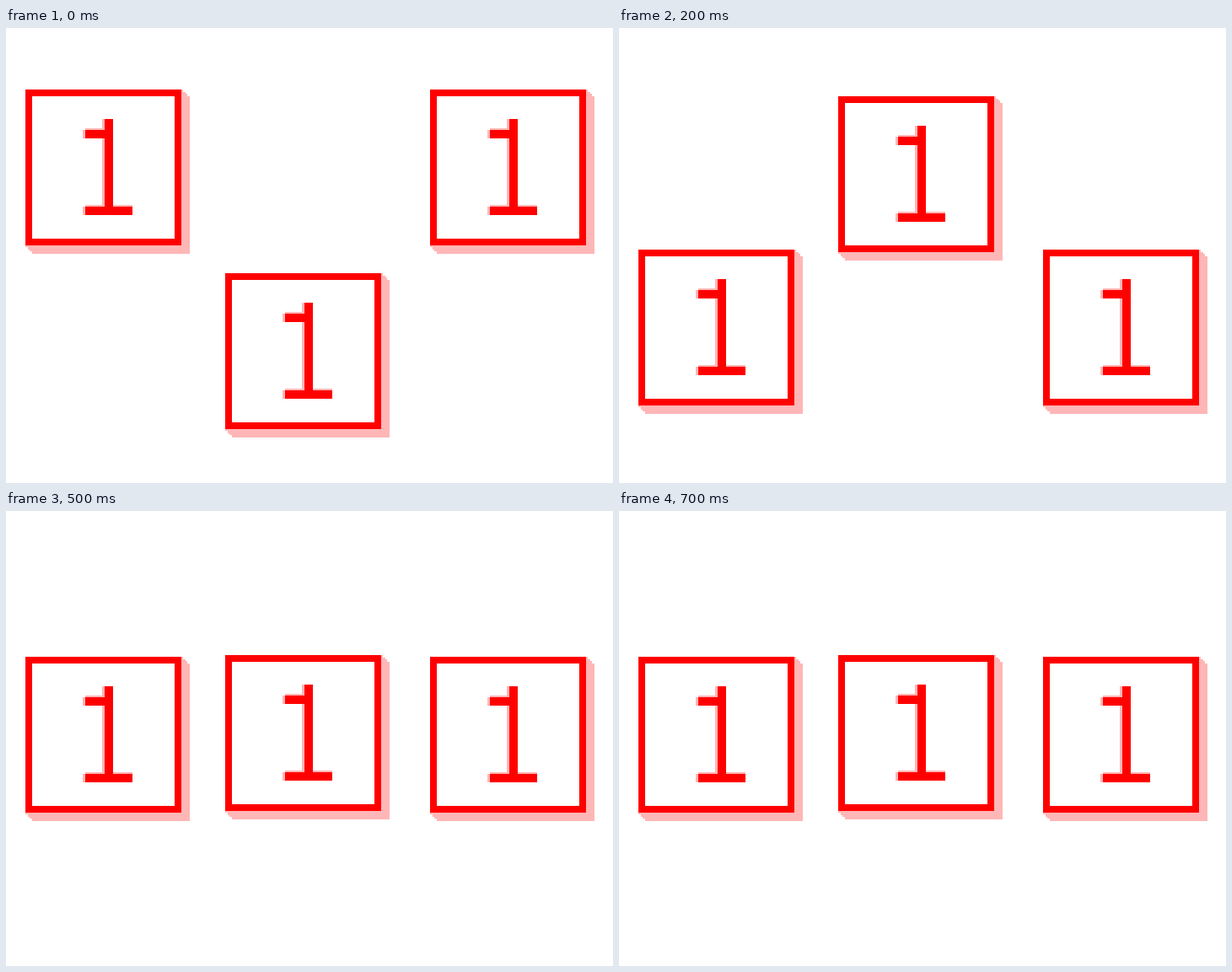
Write an HTML page that moves like this. It is 720 by 540 pixels and loops after 800 ms.

```html
<!DOCTYPE html>
<html lang="en">
<head>
<meta charset="utf-8">
<title>Bouncing boxes</title>
<style>
  html, body {
    margin: 0;
    width: 100%;
    height: 100%;
    overflow: hidden;
    background: #fff;
  }
  svg { display: block; width: 720px; height: 540px; }
  .ink { fill: #f00; }
  .pale { fill: #ffb6b6; }
  .side { animation: side 400ms step-end infinite; }
  .mid { animation: mid 400ms step-end infinite; }

  @keyframes side {
    0%, 100% { transform: translateY(73px); }
    25%, 75% { transform: translateY(173px); }
    50% { transform: translateY(263px); }
  }
  @keyframes mid {
    0%, 100% { transform: translateY(291px); }
    25%, 75% { transform: translateY(171px); }
    50% { transform: translateY(81px); }
  }
</style>
</head>
<body>
<svg viewBox="0 0 720 540" shape-rendering="crispEdges" role="img" aria-label="1 1 1">
  <defs>
    <g id="box">
      <!-- stepped drop shadow -->
      <path class="pale" d="M185 0H187V3H190V5H192V8H195V195H8V192H5V190H3V187H0V185H185Z"/>
      <!-- frame -->
      <path class="ink" fill-rule="evenodd" d="M0 0H185V185H0ZM8 8V177H177V8Z"/>
      <!-- digit: soft edge, then strokes -->
      <path class="pale" d="M91 35H94V139H91ZM71 46H91V48H71ZM68 48H71V58H68ZM71 137H127V139H71ZM68 139H71V149H68Z"/>
      <path class="ink" d="M94 35H104V139H127V149H71V139H94V58H71V48H94Z"/>
    </g>
  </defs>
  <g class="side">
    <use href="#box" x="23"/>
    <use href="#box" x="503"/>
  </g>
  <g class="mid">
    <use href="#box" x="260"/>
  </g>
</svg>
</body>
</html>
```
